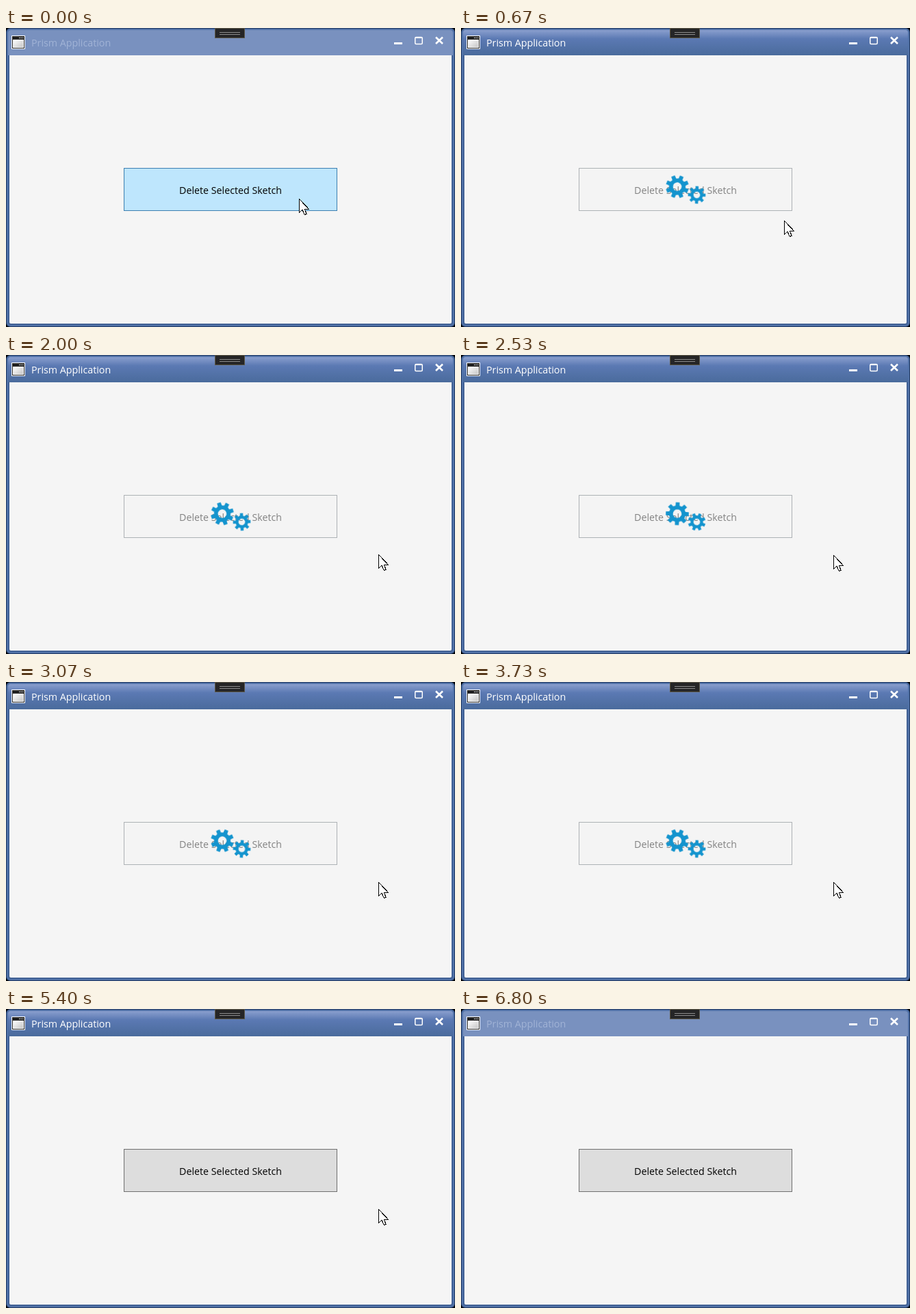
These frames come from a looping animation (656 by 438 pixels, 7 s). An HTML page:

```html
<!DOCTYPE html>
<html lang="en">
<head>
<meta charset="utf-8">
<title>Prism Application</title>
<style>
  html, body { margin: 0; width: 100%; height: 100%; overflow: hidden; background: #000; }
  svg { display: block; width: 656px; height: 438px; overflow: hidden; }
  text { font: 14.25px "Open Sans", "Noto Sans", sans-serif; }

  /* Everything advances at 15 steps per second: 105 steps in 7 s. */
  .anim { animation: 7s step-end -4ms infinite; }

  #active { animation-name: active; }
  #caption { animation-name: caption; }
  #button { animation-name: button; }
  #label { animation-name: label; }
  #busy { animation-name: busy; }
  #cursor { animation-name: cursor; }
  #big, #small { animation-timing-function: steps(105); }
  #big { animation-name: clockwise; }
  #small { animation-name: counter; }

  @keyframes active {
    0%, 97.143% { opacity: 0; }
    3.81% { opacity: 1; }
  }
  @keyframes caption {
    0%, 97.143% { fill: #a1b3d6; }
    3.81% { fill: #fff; }
  }
  @keyframes button {
    0% { fill: #bee6fd; stroke: #3c7fb1; }
    3.81% { fill: #f4f4f4; stroke: #adb2b5; }
    77.143%, 100% { fill: #ddd; stroke: #707070; }
  }
  @keyframes label {
    0%, 77.143% { fill: #000; }
    3.81% { fill: #838383; }
  }
  @keyframes busy {
    0%, 77.143% { opacity: 0; }
    3.81% { opacity: 1; }
  }
  /* One turn takes 1.75 s; the offsets keep the teeth meshed. */
  @keyframes clockwise { from { transform: rotate(21deg); } to { transform: rotate(1461deg); } }
  @keyframes counter { from { transform: rotate(4deg); } to { transform: rotate(-1436deg); } }
  @keyframes cursor {
    0% { transform: translate(428px, 250px); }
    1.905% { transform: translate(428px, 249px); }
    4.762% { transform: translate(428px, 249px); animation-timing-function: steps(5); }
    9.524% { transform: translate(472px, 282px); animation-timing-function: steps(2); }
    11.429% { transform: translate(520px, 298px); animation-timing-function: steps(2); }
    13.333% { transform: translate(541px, 295px); }
    14.286% { transform: translate(545px, 295px); }
    24.762% { transform: translate(545px, 294px); }
    28.571% { transform: translate(544px, 292px); }
    35.238% { transform: translate(544px, 293px); }
    86.667% { transform: translate(539px, 368px); }
    87.619%, 100% { transform: translate(700px, 500px); }
  }
</style>
</head>
<body>
<svg viewBox="0 0 656 438">
  <defs>
    <linearGradient id="titleFill" x2="0" y2="1">
      <stop offset="0" stop-color="#8a9fce"/>
      <stop offset=".35" stop-color="#5b79b3"/>
      <stop offset="1" stop-color="#4a6b9c"/>
    </linearGradient>
    <linearGradient id="pageFill" x2="1" y2="1">
      <stop offset="0" stop-color="#fff"/>
      <stop offset="1" stop-color="#c4c4c4"/>
    </linearGradient>
  </defs>

  <!-- Window frame -->
  <rect width="656" height="438" fill="#000"/>
  <rect width="656" height="438" rx="6" fill="#223a63"/>
  <rect x="1" y="1" width="654" height="436" rx="5" fill="#5172a8"/>
  <rect x="3" y="3" width="650" height="432" rx="4" fill="#426296"/>
  <path d="M3 40V7q0-4 4-4H649q4 0 4 4V40z" fill="#7991bf"/>
  <path id="active" class="anim" d="M3 40V7q0-4 4-4H649q4 0 4 4V40z" fill="url(#titleFill)"/>
  <path d="M5 40H651V431q0 2-2 2H7q-2 0-2-2z" fill="#f5f5f5"/>

  <!-- Title bar -->
  <rect x="8" y="11" width="20" height="20" fill="#fff"/>
  <rect x="9" y="12" width="18" height="18" fill="#222"/>
  <rect x="10" y="17" width="16" height="12" fill="#fff"/>
  <rect x="11" y="18" width="14" height="10" fill="url(#pageFill)"/>
  <path d="M19 14.5h1.5m1 0h1.5m1 0h1.5" stroke="#fff"/>
  <text id="caption" class="anim" x="37" y="27">Prism Application</text>
  <g fill="none" stroke="#fff">
    <path d="M567 22.5h12" stroke-width="3"/>
    <rect x="597.75" y="13.5" width="10.5" height="10" rx="1.5" stroke-width="1.5"/>
    <path d="M598 14h10" stroke-width="2"/>
    <path d="M628 13.5l10 9.5m0-9.5l-10 9.5" stroke-width="2.6"/>
  </g>

  <!-- Docked toolbar handle -->
  <rect x="305.5" y=".5" width="43" height="14" fill="#252526" stroke="#5c5747"/>
  <path d="M312 6.5h30m-30 3h30" stroke="#8c8c8c"/>

  <rect id="button" class="anim" x="172.5" y="205.5" width="311" height="62"/>
  <text id="label" class="anim" x="328" y="243" text-anchor="middle">Delete Selected Sketch</text>

  <g id="busy" class="anim" fill="#1494ce" fill-rule="evenodd">
    <g transform="translate(316 232.5)"><path id="big" class="anim"/></g>
    <g transform="translate(344.5 244.5)"><path id="small" class="anim"/></g>
  </g>

  <g id="cursor" class="anim" shape-rendering="crispEdges">
    <path d="M.5.5V20.3L5 16.2 8.3 23.5 11.2 22.3 8 15H14.2z" fill="#fff" stroke="#000"/>
  </g>
</svg>
<script>
  const TEETH = 8;

  function gearPath(outer, root, hole) {
    const point = (radius, degrees) => {
      const a = degrees * Math.PI / 180;
      return `${(radius * Math.sin(a)).toFixed(2)} ${(-radius * Math.cos(a)).toFixed(2)}`;
    };
    const points = [];
    for (let i = 0; i < TEETH; i++) {
      const mid = i * 360 / TEETH;
      points.push(point(root, mid - 14), point(outer, mid - 9.5),
                  point(outer, mid + 9.5), point(root, mid + 14));
    }
    const arc = `a${hole} ${hole} 0 1 0`;
    return `M${points.join("L")}zM${-hole} 0${arc} ${2 * hole} 0${arc} ${-2 * hole} 0z`;
  }

  document.getElementById("big").setAttribute("d", gearPath(17, 12.2, 6.3));
  document.getElementById("small").setAttribute("d", gearPath(13, 9.2, 4.8));
</script>
</body>
</html>
```
